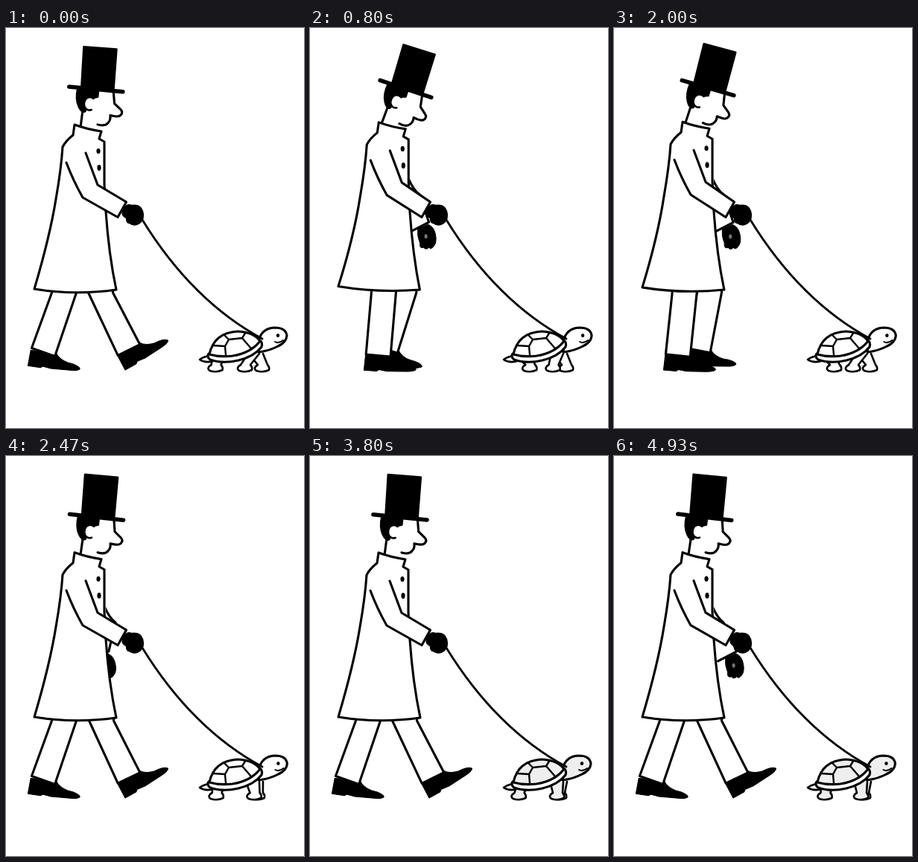
Recreate the animation shown at these times as an HTML page with a canvas. Size 400 px wide and 538 px high, loop 4.99 s.

```html
<!DOCTYPE html>
<html lang="en">
<head>
<meta charset="utf-8">
<title>Walking the tortoise</title>
<style>
html, body { margin: 0; width: 100%; height: 100%; overflow: hidden; background: #fff; }
canvas { display: block; }
</style>
</head>
<body>
<canvas id="stage" width="400" height="538"></canvas>
<script>
const ctx = document.getElementById('stage').getContext('2d');
const LOOP = 4990, TICKS = 75, STEPS = 4;

const clamp = x => Math.min(1, Math.max(0, x));
const smooth = x => { x = clamp(x); return x * x * (3 - 2 * x); };
const bell = (x, mid, width) => Math.exp(-(((x - mid) / width) ** 2));
const wave = x => Math.cos(2 * Math.PI * x);

const SHOE = 'M-17 -1 L17 -1 Q22 8 34 11 Q49 13 51 18 Q49 21 38 21 L12 21 L1 19 L-2 21 L-19 20 Q-18 10 -17 -1Z';
const HAND = 'M-14 -4 Q-10 -15 -2 -12 Q10 -14 13 -4 Q16 6 9 12 Q2 17 -5 12 Q-9 12 -9 5 Q-16 2 -14 -4Z';
const FAR_GLOVE = 'M-12 -10 L2 -16 Q10 -13 12 -2 Q14 9 9 14 Q6 18 3 15 Q-1 19 -4 15 Q-10 17 -9 9 Q-13 0 -12 -10Z';

function draw(d, fill, width = 3.1) {
  const p = new Path2D(d);
  if (fill) { ctx.fillStyle = fill; ctx.fill(p); }
  if (width) { ctx.lineWidth = width; ctx.stroke(p); }
}

function at(x, y, deg, body) {
  ctx.save();
  ctx.translate(x, y);
  ctx.rotate(deg * Math.PI / 180);
  body();
  ctx.restore();
}

function dot(x, y, rx, ry, color = '#000') {
  ctx.fillStyle = color;
  ctx.beginPath();
  ctx.ellipse(x, y, rx, ry, 0, 0, 7);
  ctx.fill();
}

// Trouser leg from the coat hem to an ankle, with its shoe turned
function leg(hem, x, y, turn) {
  const dx = x - hem, dy = y - 356, len = Math.hypot(dx, dy);
  const px = 16.5 * dy / len, py = -16.5 * dx / len;
  at(x, y, turn, () => draw(SHOE, '#000', 1));
  draw(`M${hem - 16.5} 352 v4 L${x - px} ${y - py} L${x + px} ${y + py} L${hem + 16.5} 356 v-4`, '#fff');
}

// Planted foot: heel strike in front, flat, left behind
function stanceLeg(s) {
  const k = clamp((s - .06) / .89);
  leg(127 - 49 * smooth(k), 165 - 115 * k ** .75,
    433 + 3 * k + 6 * Math.sin(Math.PI * k), 5 * k ** 3 - 33 * (1 - k) ** 8);
}

// Free foot: heel peels up, passes, reaches forward
function swingLeg(s) {
  const k = clamp((s - .06) / .88), lift = bell(k, .37, .13);
  leg(78 + 50 * smooth(1.6 * k), 50 + 115 * smooth(k ** 1.3),
    436 - 3 * k - 17 * lift, 5 + 35 * lift - 38 * k ** 4);
}

function farArm(s) {
  const out = smooth((s - .42) / .1) * (1 - smooth((s - .97) / .03));
  if (out < .05) return;
  const x = 118 + out * (32 + 12 * s), y = 278 + 4 * s;
  ctx.save();
  ctx.beginPath();
  ctx.rect(134, 190, 60, 120);
  ctx.clip();
  draw(`M132 202 Q138 217 147 224 L${x + 3} ${y - 19} L${x - 22} ${y - 6}`, '#fff');
  at(x, y, 0, () => { draw(FAR_GLOVE, '#000', 1); dot(-1, 0, 2, 3, '#777'); });
  ctx.restore();
}

function head() {
  draw('M-12 -22 L-15 2 L8 12 L10 1 Q19 3 23 -3 Q26 -8 26 -12 Q37 -9 40 -13 Q43 -17 38 -21 L31 -28 L30 -44 L-10 -46Z', '#fff', 0);
  draw('M-12 -18 L-15 3 M8 0 Q18 3 22 -2 Q26 -6 25 -12 Q36 -9 39 -12 Q43 -16 39 -20 L31 -28 L30 -43');
  draw('M-18 -50 Q-22 -34 -17 -24 Q-13 -15 -8 -18 L-4 -34 L9 -37 L10 -46Z', '#000', 2);
  draw('M4 -34 Q-2 -40 -7 -36 Q-12 -31 -9 -23 Q-6 -17 0 -20 L5 -27Z', '#fff', 0);
  draw('M3 -35 Q-2 -39 -7 -35 Q-11 -30 -9 -24 Q-6 -18 0 -20', null, 2.5);
  draw('M-9 -105 L35 -101 L30 -45 L-13 -50Z', '#000', 2.5);
  draw('M-29.5 -51.5 L42.5 -43.5', null, 5.5);
}

function man(s) {
  const nod = bell(s, .4, .17), pass = bell(s, .7, .2);
  const bx = 2.5 * bell(s, .4, .1), by = -4 * bell(s, .65, .2);
  const hemX = 148 - 6 * bell(s, .4, .1), hemY = 351 - 4.5 * bell(s, .48, .14);

  swingLeg(s);
  stanceLeg(s);
  farArm(s);
  at(115 - 3.5 * bell(s, .6, .12), 130 + by, 18.7 * nod + 8 * pass - 1, head);

  const p = (x, y) => `${x + bx} ${y + by} `;
  draw(`M${p(92, 130)}Q${p(108, 136)}${p(128, 139)}L${p(125, 149)}L${p(132, 153)}L${p(132, 210)}` +
    `L134 247 Q138 305 ${hemX} 352 Q92 ${hemY + 9} 38 ${hemY} Q59 280 ${p(67, 230)}` +
    `Q${p(74, 190)}${p(76, 160)}Q${p(80, 152)}${p(90, 144)}Z`, '#fff');
  dot(124 + bx, 165.5 + by, 2.6, 3.6);
  dot(125 + bx, 188 + by, 2.6, 4);

  draw(`M${p(81, 181)}Q${p(90, 205)}${p(103, 228)}L150 254.5 L161.5 234 L${p(123, 211)}L${p(107, 168)}`, '#fff');
  at(170.5, 250.5, 0, () => draw(HAND, '#000', 1.5));
}

function paw(top, x, tone) {
  draw(`M${top - 8} 441 L${x - 7} 453 Q${x - 14} 457 ${x - 9} 461 Q${x} 464 ${x + 8} 460 Q${x + 9} 456 ${x + 6} 453 L${top + 9} 438`, tone, 2.6);
}

function tortoise(k, s) {
  const stride = 1 - smooth((k - .4) / .15);
  const tone = k > .68 ? '#eeeeee' : '#fff';

  draw('M276 441 Q266 441 260 446 Q267 451 278 448', tone, 2.6);
  paw(336, 336 + 9 * stride, tone);
  paw(331, 333 - stride * (3 + 8 * wave(5 * k)), tone);
  paw(286, 289 - 8 * wave(s - .12), tone);

  at(1.6 * bell(s, .7, .25) - 1, 0, 0, () => {
    draw('M340 421 Q344 404 361 403 Q377 403 378 414 Q377 423 366 428 Q355 434 340 436Z', tone);
    draw('M362 422 Q367 425 373 420', null, 2);
    if (Math.abs(k - .6) > .03) dot(366, 413.5, 2.2, 2.6);
  });

  draw('M272 438 Q269 442 274 446 Q291 452 312 447 Q333 442 343 429 Q345 422 340 420Z', '#fff');
  draw('M273 439 Q279 410 311 408 Q332 409 341 421 Q329 437 304 441 Q287 443 273 439Z', tone);
  draw('M292 412 L299 419 L317 417 L322 409 M299 419 L294 428 L295 440 M294 428 L278 427 M317 417 L329 431', null, 2.4);
}

function frame(now) {
  const tick = Math.min(TICKS - 1, Math.floor((now % LOOP + 4) * TICKS / LOOP));
  const k = tick / TICKS;
  // An even walk that sets off a little slowly
  const s = (STEPS * k + .02 - 2.8 * k * (1 - k) ** 8) % 1;
  ctx.fillStyle = '#fff';
  ctx.fillRect(0, 0, 400, 538);
  ctx.strokeStyle = '#000';
  ctx.lineJoin = ctx.lineCap = 'round';
  man(s);
  tortoise(k, s);
  draw('M183 258 Q250 367 344 418', null, 2.8);
}

const start = performance.now();
function play() {
  frame(performance.now() - start);
  requestAnimationFrame(play);
}
play();
</script>
</body>
</html>
```
